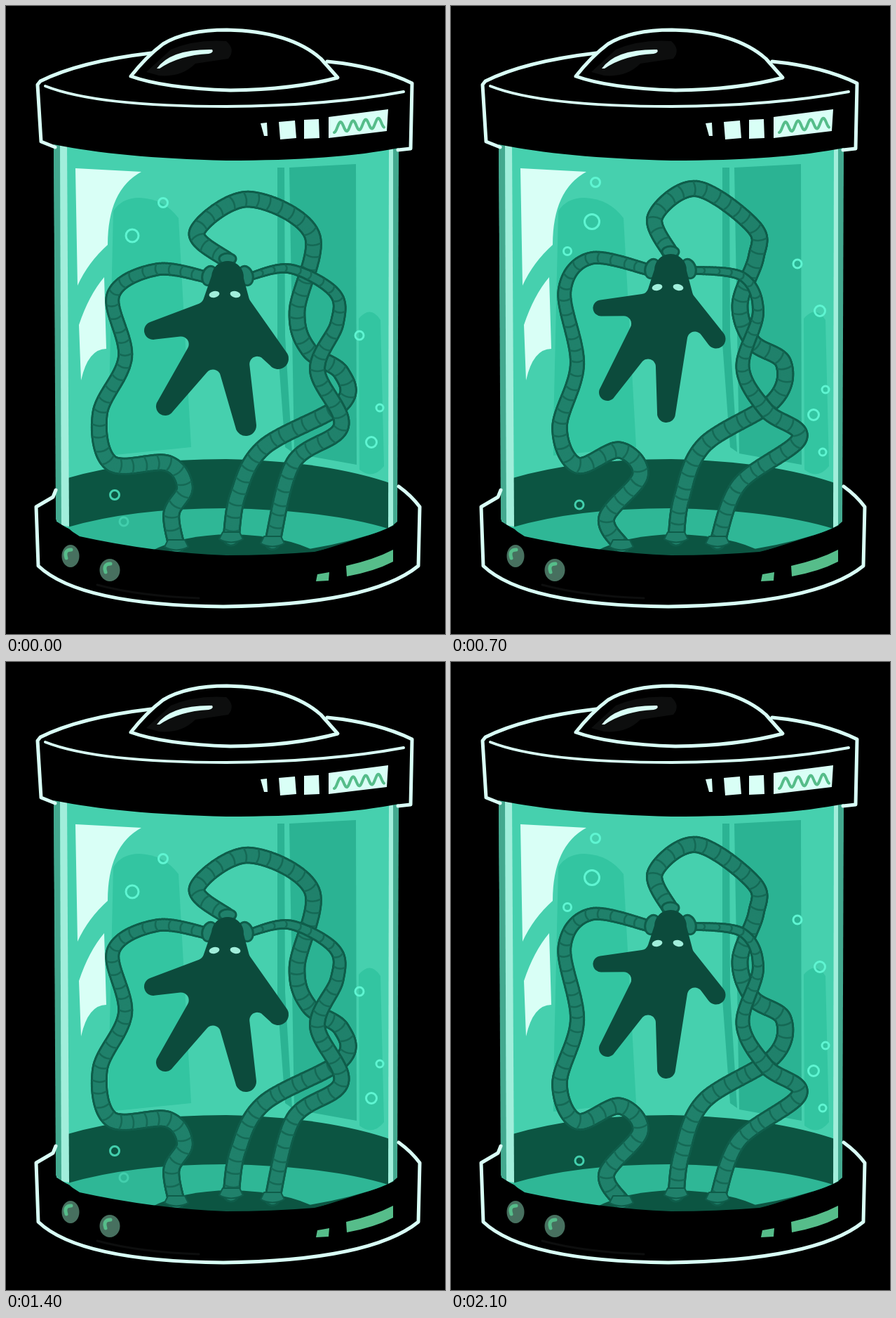
An HTML page with a canvas for the animation above (2800 ms loop, 626 by 894 pixels).

```html
<!DOCTYPE html>
<html lang="en">
<head>
<meta charset="utf-8">
<title>Specimen tank</title>
<style>
  html, body { margin: 0; width: 100%; height: 100%; overflow: hidden; background: #000; }
  canvas { display: block; }
</style>
</head>
<body>
<canvas id="stage" width="626" height="894"></canvas>
<script>
const ctx = document.getElementById('stage').getContext('2d');
const HOLD = 700;
const INK = '#d9fff6', GLASS = '#46d0ae', PANEL = '#33c5a1', SHADE = '#2bb393';
const WALL = '#0c5542', FLOOR = '#2fb796', BODY = '#0c4b3c', TUBE = '#20816b', EDGE = '#0f5d4a', RIB = '#156955';
const PALE = '#a1eedb', RIM = '#43a98f', BUBBLE = '#5ff5d2', DIM = '#43cfad';
const GREEN = '#56bd8a', KNOB = '#47705f', GLOSS = '#0d0e0e';
const RIB_GAP = 18;

// Tubes run from a socket on the head, through a few key points, to a fixed foot.
const TUBES = [
  { name: 'crown', socket: [0, -24], foot: [321, 757], from: 24, to: 25 },
  { name: 'left', socket: [-29, 0], foot: [243, 768], from: 18, to: 25 },
  { name: 'right', socket: [29, 0], foot: [380, 763], from: 12, to: 24 }
];

// Limbs go clockwise: head, right hand, right foot, left foot, left hand.
// A limb has a rounded tip [x, y, radius]; "pit" is the corner before the next limb.
const poses = [
  {
    limbs: [
      { tip: [316, 386, 23], pit: [347, 418] },
      { tip: [388, 502, 15], pit: [344, 482] },
      { tip: [342, 597, 15], pit: [300, 506] },
      { tip: [227, 570, 13], pit: [270, 468] },
      { tip: [210, 462, 13], pit: [280, 422] }
    ],
    crown: [[272, 322], [345, 275], [436, 325], [415, 435], [432, 490], [478, 522], [478, 567], [368, 628], [331, 695]],
    left: [[215, 375], [153, 411], [170, 500], [134, 580], [150, 651], [230, 651], [255, 685], [236, 722]],
    right: [[405, 374], [468, 408], [472, 452], [444, 518], [478, 598], [410, 650]],
    bubbles: [[224, 280, 6.5], [180, 327, 9], [504, 469, 6], [533, 572, 5], [521, 621, 7.5], [155, 696, 6.5], [168, 734, 6]]
  },
  {
    limbs: [
      { tip: [313, 376, 23], pit: [345, 411] },
      { tip: [378, 474, 13.5], pit: [341, 447] },
      { tip: [307, 580, 13], pit: [291, 483] },
      { tip: [223, 550, 12], pit: [264, 441] },
      { tip: [214, 430, 11.5], pit: [279, 409] }
    ],
    crown: [[291, 300], [350, 260], [432, 315], [435, 358], [412, 425], [430, 478], [474, 508], [460, 562], [361, 625], [329, 700]],
    left: [[200, 359], [162, 405], [180, 510], [155, 600], [180, 654], [240, 632], [270, 668], [222, 728]],
    right: [[415, 385], [438, 435], [416, 515], [450, 576], [497, 615], [411, 681]],
    bubbles: [[206, 251, 6.5], [201, 307, 10.5], [166, 349, 5.5], [494, 367, 6], [526, 434, 7.5], [534, 546, 5],
      [517, 582, 7.5], [530, 635, 5], [183, 710, 6]]
  }
];

function path(d, fill, stroke, width = 5) {
  const p = new Path2D(d);
  if (fill) { ctx.fillStyle = fill; ctx.fill(p); }
  if (stroke) { ctx.strokeStyle = stroke; ctx.lineWidth = width; ctx.stroke(p); }
}

function oval(x, y, rx, ry, fill, stroke, tilt = 0) {
  ctx.beginPath();
  ctx.ellipse(x, y, rx, ry, tilt, 0, Math.PI * 2);
  if (fill) { ctx.fillStyle = fill; ctx.fill(); }
  if (stroke) { ctx.strokeStyle = stroke; ctx.lineWidth = 3; ctx.stroke(); }
}

// Catmull-Rom spline.
function spline(points, steps = 20) {
  const last = points.length - 1, out = [];
  const at = i => points[Math.max(0, Math.min(last, i))];
  for (let i = 0; i < last * steps; i++) {
    const k = Math.floor(i / steps), t = i / steps - k;
    const [a, b, c, d] = [at(k - 1), at(k), at(k + 1), at(k + 2)];
    out.push([0, 1].map(n => b[n] + 0.5 * t * (c[n] - a[n] +
      t * (2 * a[n] - 5 * b[n] + 4 * c[n] - d[n] + t * (3 * (b[n] - c[n]) + d[n] - a[n])))));
  }
  return [...out, points[last]];
}

function tube(points, from, to) {
  const pts = spline(points), last = pts.length - 1;
  const width = i => from + (to - from) * Math.min(1, 1.8 * i / last);
  const layer = (color, inset) => {
    ctx.strokeStyle = color;
    for (let i = 0; i < last; i++) {
      ctx.lineWidth = width(i) - inset;
      ctx.beginPath();
      ctx.moveTo(...pts[i]);
      ctx.lineTo(...pts[i + 1]);
      ctx.stroke();
    }
  };
  layer(EDGE, 0);
  layer(TUBE, 6);
  ctx.strokeStyle = RIB;
  ctx.lineWidth = 2.5;
  let travelled = 0;
  for (let i = 1; i < last; i++) {
    const [x, y] = pts[i], dx = x - pts[i - 1][0], dy = y - pts[i - 1][1];
    const len = Math.hypot(dx, dy);
    travelled += len;
    if (travelled < RIB_GAP) continue;
    travelled -= RIB_GAP;
    const ux = dx / len, uy = dy / len, r = width(i) / 2 - 3;
    ctx.beginPath();
    ctx.moveTo(x - uy * r, y + ux * r);
    ctx.quadraticCurveTo(x + ux * 4, y + uy * 4, x + uy * r, y - ux * r);
    ctx.stroke();
  }
}

// Round limb tips joined by rounded corners at the pits.
function body(limbs) {
  const count = limbs.length, QUARTER = Math.PI / 2;
  const aim = limbs.map(({ tip, pit }, i) => {
    const before = limbs[(i + count - 1) % count].pit;
    return Math.atan2(tip[1] - (pit[1] + before[1]) / 2, tip[0] - (pit[0] + before[0]) / 2);
  });
  ctx.beginPath();
  limbs.forEach(({ tip: [x, y, r], pit }, i) => {
    const j = (i + 1) % count, [nx, ny, nr] = limbs[j].tip, start = aim[j] - QUARTER;
    ctx.arc(x, y, r, aim[i] - QUARTER, aim[i] + QUARTER);
    ctx.arcTo(...pit, nx + nr * Math.cos(start), ny + nr * Math.sin(start), 11);
  });
  ctx.fillStyle = BODY;
  ctx.fill();
}

function tankBack() {
  path('M68 190H560L553 740Q440 782 314 782Q150 780 72 735Z', GLASS);
  path('M146 640V600L153 292Q165 273 190 273Q225 274 246 302L264 628Z', PANEL);
  path('M387 230H397L398 470L408 635L398 628L387 480Z', SHADE);
  path('M404 230L499 225L500 653L411 637Z', SHADE);
  path('M503 445Q520 425 534 447L539 655Q523 675 504 660Z', PANEL);
  path('M99 231L193 236Q145 262 145 340Q117 365 102 398Z', INK);
  path('M104 454Q118 412 140 386L143 488Q117 488 107 533Z', INK);
  path('M88 672Q180 645 314 645Q460 648 553 681V742L440 778H150L88 740Z', WALL);
  path('M88 742Q180 715 314 715Q460 718 545 744Q440 782 314 782Q180 780 100 754Z', FLOOR);
  path('M207 776Q250 753 320 752Q400 754 442 777Q380 786 314 784Z', WALL);
}

function specimen(pose) {
  const [hx, hy] = pose.limbs[0].tip;
  for (const { name, socket, foot, from, to } of TUBES) {
    tube([[hx + socket[0], hy + socket[1]], ...pose[name], foot], from, to);
    const [x, y] = foot;
    path(`M${x - 12} ${y - 8}l-5 10q17 9 34 0l-5 -10Z`, TUBE, EDGE, 2);
  }
  for (const side of [-1, 1]) oval(hx + side * 26, hy - 2, 10, 14, TUBE, EDGE, -0.3 * side);
  oval(hx, hy - 26, 12, 8, TUBE, EDGE);
  body(pose.limbs);
  for (const side of [-1, 1]) oval(hx - 4 + side * 15, hy + 24.5, 7.5, 4.5, PALE, null, 0.2 * side);
  for (const [x, y, r] of pose.bubbles) oval(x, y, r, r, null, y > 660 ? DIM : BUBBLE);
}

function glassEdges() {
  path('M68 195H77L79 739L71 731Z', RIM);
  path('M77 195H87L90 741L79 739Z', PALE);
  path('M546 198H553L552 739L545 743Z', PALE);
  path('M552 198H560L558 734L552 739Z', RIM);
}

function lid() {
  path('M45 110L205 66L460 78L580 109L577 204L560 202Q470 220 314 220Q160 216 68 197L49 194Z', '#000');
  path('M207 67Q105 79 49 107L45 112L50 193L70 201M458 79Q530 86 579 110L577 203L559 205', null, INK);
  path('M56 114Q130 143 314 143Q460 142 567 122', null, INK, 4);
  path('M178 100Q200 72 224 54Q257 34 315 34Q405 36 449 75L473 102Q410 119 320 120Q225 117 178 100Z', '#000', INK);
  path('M235 62Q270 47 314 50Q328 62 317 75L270 82Q250 102 218 99L200 94Z', GLOSS);
  path('M215 89Q235 61 294 62Q297 66 289 68Q247 70 219 89Z', INK);
  path('M363 167l9 -1l1 19h-5ZM389 165l23 -2l2 25l-23 2ZM425 162l21 -1l1 27l-22 1ZM460 158L545 147L543 178L460 188Z', INK);
  let wave = 'M468 180';
  for (let x = 468; x <= 539; x++) wave += `L${x} ${173 - (x - 468) * 0.1 + 7 * Math.cos((x - 468) * 0.35)}`;
  path(wave, null, GREEN, 4);
}

function base() {
  const lower = 'L46 797Q105 853 310 855Q520 852 588 797L590 713';
  path(`M70 688L42 713${lower}L560 682L558 735L552 740Q500 764 440 777Q380 782 314 782Q210 778 105 755L71 733Z`, '#000');
  path(`M71 689L67 699L43 713${lower}Q578 697 560 684`, null, INK);
  path('M130 824Q190 840 275 843', null, GLOSS, 3);
  for (const [x, y, r] of [[92, 783, 12.5], [148, 803, 14.5]]) {
    oval(x, y, r, 16, KNOB);
    path(`M${x - 6} ${y + 3}q-4 -12 7 -12`, null, GREEN);
  }
  path('M485 797Q525 788 552 774V791Q525 805 486 812ZM444 809L461 806L460 818L442 819Z', GREEN);
}

function draw() {
  const pose = poses[Math.floor(performance.now() / HOLD) % poses.length];
  ctx.lineCap = ctx.lineJoin = 'round';
  ctx.fillStyle = '#000';
  ctx.fillRect(0, 0, 626, 894);
  tankBack();
  specimen(pose);
  glassEdges();
  base();
  lid();
  requestAnimationFrame(draw);
}
draw();
</script>
</body>
</html>
```
